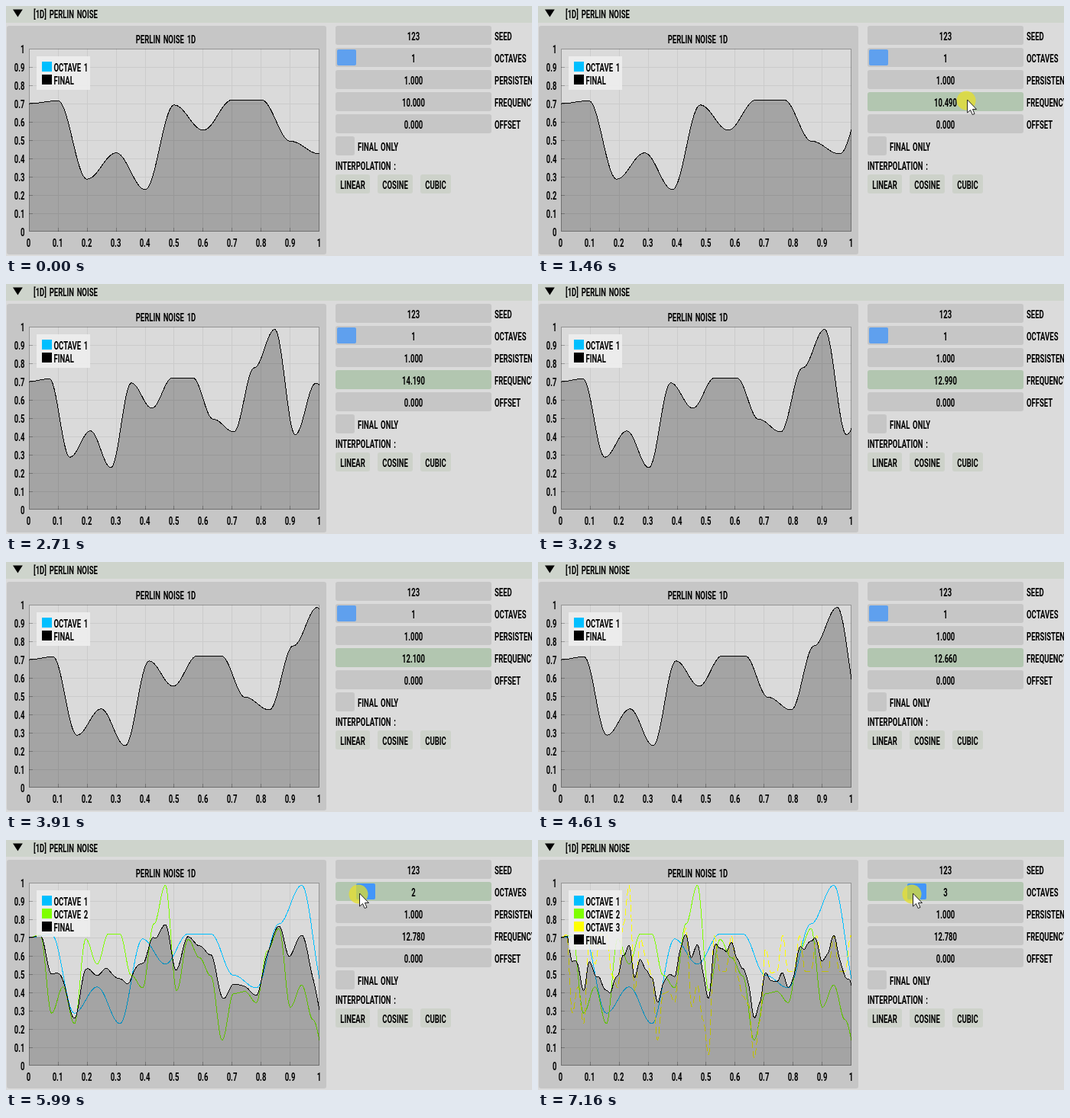
Recreate the animation shown at these times as an HTML page. Size 688 px wide and 328 px high, loop 8000 ms.

```html
<!DOCTYPE html>
<html lang="en">
<head>
<meta charset="utf-8">
<title>Perlin noise panel</title>
<style>
  html, body { margin: 0; width: 100%; height: 100%; overflow: hidden; background: #dbdbdb; }
  svg { display: block; width: 688px; height: 328px; }
  text { font: 700 14px Roboto, "Liberation Sans", sans-serif; word-spacing: 2px; fill: #000; }
  .curve { fill: none; stroke-width: 1; stroke-linejoin: round; shape-rendering: crispEdges; }
</style>
</head>
<body>
<svg id="stage" viewBox="0 0 688 328"></svg>
<script>
const LOOP = 8000;
const PLOT = { x: 30, y: 56, w: 380, h: 240 };
const FRAME = "#c6c6c6", ACTIVE = "#b2c6b0", BUTTON = "#cdd2ca";
const CONDENSE = 0.68;
const OCTAVES = [["OCTAVE 1", "#00bfff"], ["OCTAVE 2", "#7fff00"], ["OCTAVE 3", "#ffff00"]];

// Heights at the first lattice points; a ripple with one dip carries on from there
const PEAKS = [
  .7, .715, .287, .43, .23, .692, .555, .72, .72, .494, .425, .775, .985,
  .41, .69, .59, .49, .14, .393, .405, .345, .63, .75, .32, .44, .25, .06
];
const ripple = i => .58 + .13 * Math.cos(i * Math.PI * 2 / 3) - .48 * Math.exp(-(((i - 33.8) / 1.6) ** 2));
const lattice = i => PEAKS[i] ?? ripple(i);

// Dragged frequency, keys: time, value
const FREQ = [
  [850, 10], [1460, 10.49], [1640, 11.38], [2150, 14.04], [2900, 14.2],
  [3220, 12.99], [3400, 12], [3900, 12.1], [4610, 12.66], [4760, 12.78]
];
const RETURN_X = [[4900, 740], [5680, 449], [5900, 457], [5990, 462], [6240, 470], [6640, 470], [7160, 490]];

const clamp01 = u => Math.min(1, Math.max(0, u));
const ease = u => u * u * (3 - 2 * u);
const between = (t, t0, t1, a, b) => a + (b - a) * ease(clamp01((t - t0) / (t1 - t0)));

// Monotone cubic through the keys, flat at turning points and ends
function track(keys, t) {
  const last = keys.length - 1;
  if (t <= keys[0][0]) return keys[0][1];
  if (t >= keys[last][0]) return keys[last][1];
  const i = keys.findIndex(k => k[0] > t) - 1;
  const secant = n => (keys[n + 1][1] - keys[n][1]) / (keys[n + 1][0] - keys[n][0]);
  const slope = n => {
    if (n === 0 || n === last) return 0;
    const a = secant(n - 1), b = secant(n);
    return a * b <= 0 ? 0 : 2 * a * b / (a + b);
  };
  const [t0, v0] = keys[i], [t1, v1] = keys[i + 1];
  const d = t1 - t0, u = (t - t0) / d;
  return v0 + (v1 - v0) * ease(u)
    + d * u * (1 - u) * ((1 - u) * slope(i) - u * slope(i + 1));
}

function noise(x) {
  const i = Math.floor(x), e = (1 - Math.cos((x - i) * Math.PI)) / 2;
  return lattice(i) * (1 - e) + lattice(i + 1) * e;
}

const stage = document.getElementById("stage");

function add(tag, attrs, parent = stage) {
  const el = document.createElementNS("http://www.w3.org/2000/svg", tag);
  for (const k in attrs) el.setAttribute(k, attrs[k]);
  parent.appendChild(el);
  return el;
}
function box(x, y, width, height, fill, rx = 0, parent = stage) {
  return add("rect", { x, y, width, height, fill, rx }, parent);
}
function label(str, x, y, anchor = "start", parent = stage) {
  const el = add("text", { transform: `translate(${x} ${y}) scale(${CONDENSE} 1)`, "text-anchor": anchor }, parent);
  el.textContent = str;
  return el;
}
function line(d, stroke) {
  return add("path", { d, stroke, fill: "none", "shape-rendering": "crispEdges" });
}

// Header and plot frame
box(0, 0, 688, 22, "#ced4cc");
add("path", { d: "M9 4.5H21.8L15.4 14.5Z" });
label("[1D] PERLIN NOISE", 36, 16);
box(1, 26, 418, 300, FRAME, 3);
label("PERLIN NOISE 1D", 209, 49, "middle");
box(PLOT.x, PLOT.y, PLOT.w, PLOT.h, "#dadada");

let grid = "", ticks = "";
for (let i = 0; i <= 10; i++) {
  const x = PLOT.x + 38 * i, y = PLOT.y + PLOT.h - 24 * i;
  const name = i % 10 ? "0." + i : String(i / 10);
  label(name, x - 0.5, 316, "middle");
  label(name, 24.5, y + 6, "end");
  if (i % 10) {
    const gx = Math.floor(PLOT.x + .4 + 37.9 * i) + .5;
    grid += `M${gx} 56V296M30 ${y + .5}H410`;
    ticks += `M${gx} 296v-5M30 ${y + .5}h5`;
  }
}
line(grid, "rgba(0,0,0,.07)");

// Curves
const clip = add("clipPath", { id: "area" });
box(PLOT.x, PLOT.y, PLOT.w, PLOT.h, "#000", 0, clip);
const plot = add("g", { "clip-path": "url(#area)" });
const waves = OCTAVES.map(([, stroke]) => add("path", { class: "curve", stroke }, plot));
waves[2].setAttribute("stroke-dasharray", "9 4");
const shade = add("path", { fill: "#000", "fill-opacity": .25 }, plot);
const total = add("path", { class: "curve", stroke: "#000" }, plot);
line(ticks, "rgba(0,0,0,.25)");
line("M30.5 56.5H409.5V295.5H30.5Z", "rgba(0,0,0,.32)");

// Legend
const legend = box(40, 66, 70, 44, "#f0f0f0");
legend.setAttribute("fill-opacity", .88);
function entry(name, color) {
  const g = add("g", {});
  box(47, 73, 13, 13, color, 0, g);
  label(name, 62.5, 86, "start", g);
  return g;
}
const entries = OCTAVES.map(([name, color]) => entry(name, color));
const finalEntry = entry("FINAL", "#000");
const place = (el, row) => el.setAttribute("transform", `translate(0 ${17 * row})`);
entries.forEach(place);

// Controls
const controls = [["SEED", "123"], ["OCTAVES", "1"], ["PERSISTENCE", "1.000"], ["FREQUENCY", "10.000"], ["OFFSET", "0.000"]];
const rows = controls.map(([name, value], i) => {
  const y = 26 + 29 * i;
  const row = { back: box(431, y, 204, 25, FRAME, 3) };
  if (name === "OCTAVES") row.grab = box(433, y + 2, 25, 21, "#5fa0ee", 2);
  row.value = label(value, 533, y + 19, "middle");
  label(name, 639, y + 19);
  return row;
});
const [, octRow, , freqRow] = rows;
box(431, 171, 25, 25, FRAME, 3);
label("FINAL ONLY", 460, 190);
label("INTERPOLATION :", 431, 215);
[["LINEAR", 431, 45], ["COSINE", 486, 46], ["CUBIC", 542, 40]].forEach(([name, x, w]) => {
  box(x, 221, w, 25, BUTTON, 3);
  label(name, x + w / 2, 240, "middle");
});

// Pointer with its halo
const pointer = add("g", {});
add("circle", { cx: -1, r: 12.5, fill: "#e7e124", "fill-opacity": .72 }, pointer);
add("path", {
  d: "M.5-1V16L4.5 12.5L7.2 18.6L10 17.4L7.4 11.5H12.5Z",
  fill: "#fff", stroke: "#222", "stroke-width": 1
}, pointer);

function drawPlot(freq, count) {
  const paths = ["", "", ""];
  let sum = "";
  const steps = PLOT.w * 2;
  for (let s = 0; s <= steps; s++) {
    const point = v => `${s ? "L" : "M"}${PLOT.x + s / 2} ${(296 - PLOT.h * v).toFixed(2)}`;
    let acc = 0;
    for (let k = 0; k < count; k++) {
      const v = noise(s / steps * freq * 2 ** k);
      acc += v;
      paths[k] += point(v);
    }
    sum += point(acc / count);
  }
  waves.forEach((w, k) => w.setAttribute("d", paths[k]));
  total.setAttribute("d", sum);
  shade.setAttribute("d", sum + "V296H30Z");
}

// Enter from below, drag sideways, come back to the octave slider
function pointerAt(t, freq) {
  if (t < 80) return [598, 360];
  if (t < 850) return [between(t, 80, 700, 598, 511), between(t, 80, 700, 345, 139)];
  if (t < 4900) return [512 + (freq - 10) * 100, between(t, 850, 1000, 136, 124)];
  return [track(RETURN_X, t), between(t, 4900, 5680, 124, 71)];
}

function render(t) {
  const freq = track(FREQ, t);
  const [px, py] = pointerAt(t, freq);
  const pressed = t >= 5900;
  const count = pressed ? 1 + Math.round((px - 445) / 25) : 1;

  // The plot trails the slider by one tick
  drawPlot(track(FREQ, t - 50), count);
  freqRow.value.textContent = freq.toFixed(2) + "0";
  freqRow.back.setAttribute("fill", t >= 850 && t < 4940 ? ACTIVE : FRAME);

  octRow.value.textContent = count;
  octRow.back.setAttribute("fill", t > 4940 && px < 635 && py < 80 ? ACTIVE : FRAME);
  octRow.grab.setAttribute("x", 433 + 25 * (count - 1));
  octRow.grab.setAttribute("fill", pressed ? "#4296fa" : "#5fa0ee");

  legend.setAttribute("height", 27 + 17 * count);
  entries.forEach((e, i) => e.setAttribute("visibility", i < count ? "visible" : "hidden"));
  place(finalEntry, count);
  pointer.setAttribute("transform", `translate(${px.toFixed(1)} ${py.toFixed(1)})`);
}

const start = performance.now();
function tick() {
  render((performance.now() - start) % LOOP);
  requestAnimationFrame(tick);
}
tick();
</script>
</body>
</html>
```
